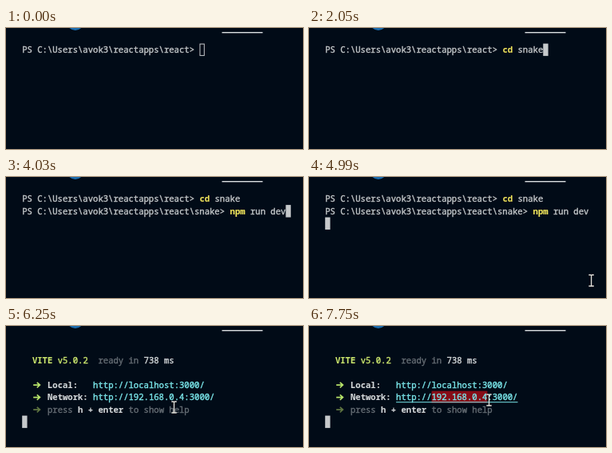
An HTML page that plays this animation: 372x152 px, repeating every 7.81 s.

```html
<!DOCTYPE html>
<html lang="en">
<head>
<meta charset="utf-8">
<title>Terminal</title>
<style>
  html, body { margin: 0; width: 100%; height: 100%; overflow: hidden; background: #010b17; }
  svg { display: block; width: 372px; height: 152px; }
  text {
    font: 500 10.58px "Noto Sans Mono", "DejaVu Sans Mono", monospace;
    white-space: pre;
    color: #c3c6c8;
    fill: currentColor;
    stroke: currentColor;
    stroke-width: .4;
    font-variant-ligatures: none;
  }
  .cmd { color: #f1e45c; font-weight: 600; stroke-width: .15; }
  .vite { color: #cde86e; }
  .url { color: #7be6ea; }
  .dim { color: #656c73; }
  .lit { color: #d5d8da; }
  .b { font-weight: 700; stroke-width: .1; }
</style>
</head>
<body>
<svg viewBox="0 0 372 152">
  <rect width="372" height="152" fill="#010b17"/>
  <circle cx="86.8" cy="-8.1" r="11" fill="#1b6cae"/>
  <rect x="270.5" y="5" width="51" height="1.4" fill="#dcdfe2"/>
  <g id="shell"></g>
  <g id="npm"></g>
  <g id="vite">
    <rect id="sel" height="15" fill="#860d17"/>
  </g>
  <rect id="line" height="1" fill="#7be6ea"/>
  <rect id="caret"/>
  <path id="mouse" d="M-3.2-7H-1Q0-7 0-6Q0-7 1-7H3.2M0-6V6M-3.2 7H-1Q0 7 0 6Q0 7 1 7H3.2"
        fill="none" stroke="#e6e3dc" stroke-width="1.3"/>
</svg>
<script>
const NS = "http://www.w3.org/2000/svg";
const LOOP = 7810, HOLD = 250, STEP = 60;
const LEFT = 20.2, CELL = 6.35, TOP = 19.6, ROW = 15.5, BASE = 11.5;
const $ = id => document.getElementById(id);
const colX = col => LEFT + col * CELL;
const rowY = row => TOP + row * ROW;

function put(group, col, row, str, cls = "") {
  const el = document.createElementNS(NS, "text");
  el.setAttribute("x", colX(col));
  el.setAttribute("y", rowY(row) + BASE);
  el.setAttribute("class", cls);
  el.textContent = str;
  $(group).append(el);
  return el;
}

function arrow(row, color) {
  const el = document.createElementNS(NS, "path");
  el.setAttribute("d", "M0 0H7.6M4.6-3.2L8.2 0L4.6 3.2");
  el.setAttribute("transform", `translate(34.2 ${rowY(row) + 8})`);
  el.setAttribute("fill", "none");
  el.setAttribute("stroke", color);
  el.setAttribute("stroke-width", 1.7);
  $("vite").append(el);
}

function set(id, attrs) {
  for (const k in attrs) $(id).setAttribute(k, attrs[k]);
}

const show = (el, on) => { el.style.display = on ? "" : "none"; };

// A prompt with a command; keys holds the time of each key press.
function prompt(row, path, cmd, keys) {
  const head = `PS ${path}> `;
  const split = cmd.indexOf(" ");
  return {
    cmd, keys, split, start: head.length,
    head: put("shell", 0, row, head),
    verb: put("shell", head.length, row, "", "cmd"),
    args: put("shell", head.length + split, row, ""),
  };
}

function type(p, t) {
  const n = p.keys.filter(k => t >= k).length;
  p.verb.textContent = p.cmd.slice(0, Math.min(n, p.split));
  p.args.textContent = p.cmd.slice(p.split, Math.max(n, p.split));
  return p.start + n;
}

const HOME = "C:\\Users\\avok3\\reactapps\\react";
const first = prompt(0, HOME, "cd snake", [1150, 1270, 1390, 1510, 1630, 1690, 1810, 1930]);
const second = prompt(1, HOME + "\\snake", "npm run dev",
  [2650, 2710, 2830, 3010, 3190, 3310, 3370, 3430, 3490, 3610, 3730]);

put("npm", 0, 3, "> snake@0.0.0 dev");
put("npm", 0, 4, "> vite");

put("vite", 2, 1, "VITE", "vite b");
put("vite", 7, 1, "v5.0.2", "vite");
put("vite", 15, 1, "ready in", "dim");
put("vite", 24, 1, "738 ms", "lit");
arrow(3, "#b6e36a");
arrow(4, "#b6e36a");
arrow(5, "#5f7541");
put("vite", 5, 3, "Local:", "lit b");
put("vite", 14, 3, "http://localhost:3000/", "url");
put("vite", 5, 4, "Network:", "lit b");
put("vite", 14, 4, "http://192.168.0.4:3000/", "url");
put("vite", 5, 5, "press", "dim");
put("vite", 11, 5, "h + enter", "lit b");
put("vite", 21, 5, "to show help", "dim");

const FOCUS = 610, ENTER_CD = 2450, ENTER_NPM = 4150, NPM_OUT = 5410, VITE_OUT = 6190;
const MOUSE_IN = 4690, HOVER = 6610, DRAG = 7030;

// time, x, y
const path = [
  [MOUSE_IN, 370, 134], [4990, 353.6, 130], [5230, 347.5, 120.5], [5950, 346, 119],
  [6250, 210.5, 102], [6610, 172, 97], [6910, 156.5, 94],
  [DRAG, 154.5, 93.5], [7570, 225.5, 93], [LOOP, 225.5, 93],
];

function mouseAt(t) {
  let i = 1;
  while (i < path.length - 1 && t > path[i][0]) i++;
  const [t0, x0, y0] = path[i - 1], [t1, x1, y1] = path[i];
  const u = Math.min(1, Math.max(0, (t - t0) / (t1 - t0)));
  const e = u * u * (3 - 2 * u);
  return [x0 + (x1 - x0) * e, y0 + (y1 - y0) * e];
}

function caretAt(t) {
  const a = type(first, t), b = type(second, t);
  if (t >= NPM_OUT) return [0, 6];
  if (t >= ENTER_NPM) return [0, 2];
  return t >= ENTER_CD ? [b, 1] : [a, 0];
}

function draw(t) {
  const [col, row] = caretAt(t);
  const solid = t >= FOCUS;
  const inset = solid ? 0 : 0.5;
  set("caret", {
    x: colX(col) + inset, y: rowY(row) + inset,
    width: CELL - 2 * inset, height: ROW - 2 * inset,
    fill: solid ? "#c6c9cb" : "none", stroke: solid ? "none" : "#c6c9cb",
  });

  const served = t >= VITE_OUT;
  show($("shell"), !served);
  show(second.head, t >= ENTER_CD);
  show($("npm"), t >= NPM_OUT && !served);
  show($("vite"), served);

  const [mx, my] = mouseAt(t);
  show($("mouse"), t >= MOUSE_IN);
  set("mouse", { transform: `translate(${mx} ${my})` });

  show($("line"), t >= HOVER);
  set("line", { x: colX(14), y: rowY(4) + 13.6, width: 24 * CELL });

  // The drag selects whole cells of the address.
  const cells = t < DRAG ? 0 : Math.min(11, Math.max(0, Math.round((mx - colX(21)) / CELL)));
  set("sel", { x: colX(21), y: rowY(4), width: cells * CELL });
}

function tick(now) {
  const t = now % LOOP;
  draw(t < HOLD ? 0 : HOLD + Math.floor((t - HOLD) / STEP) * STEP);
  requestAnimationFrame(tick);
}
draw(0);
requestAnimationFrame(tick);
</script>
</body>
</html>
```
